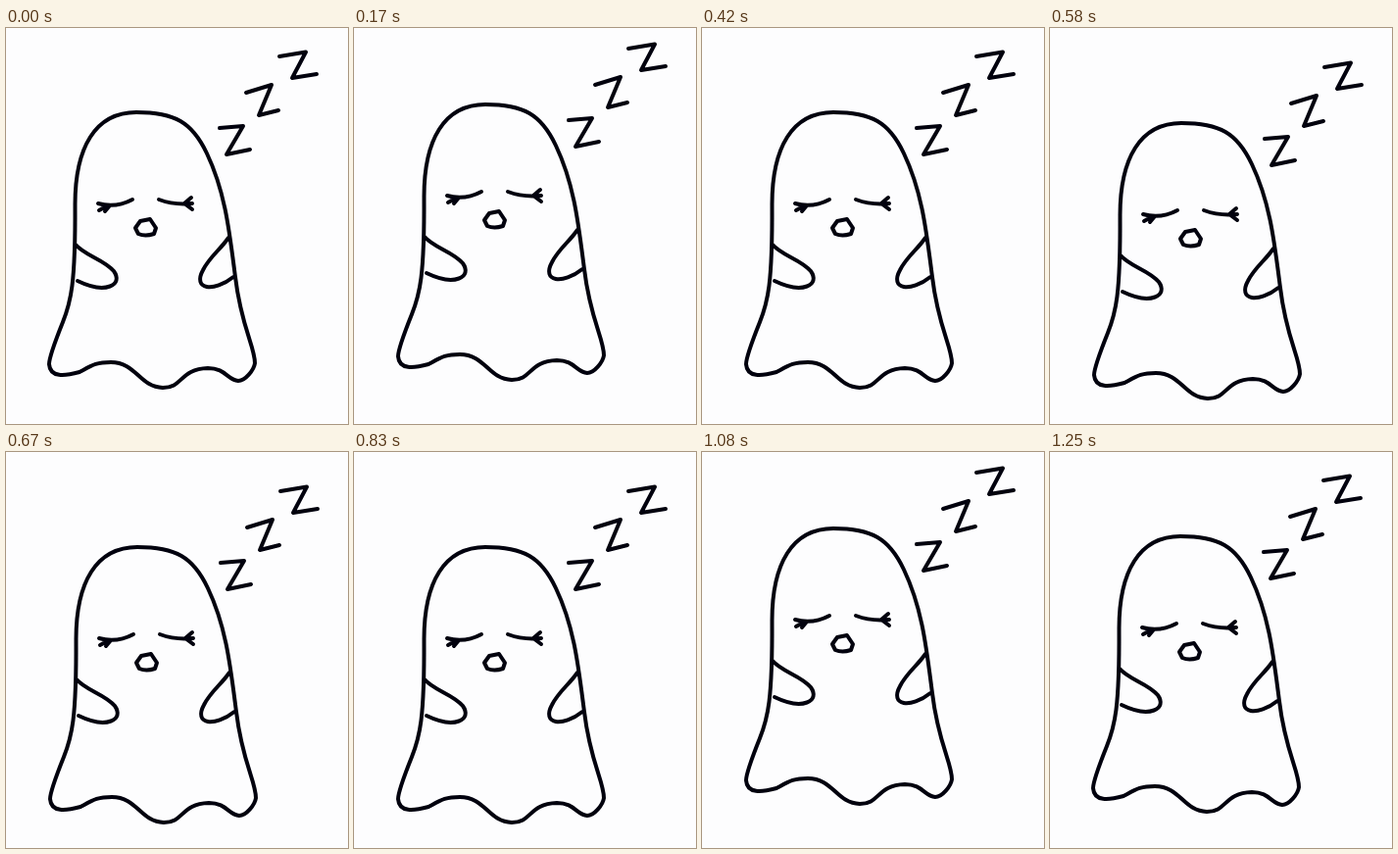
An HTML page with a canvas for the animation above (1330 ms loop, 349 by 404 pixels).

```html
<!DOCTYPE html>
<html lang="en">
<head>
<meta charset="utf-8">
<title>Sleeping ghost</title>
<style>
html, body { margin: 0; width: 100%; height: 100%; overflow: hidden; background: #fdfdfe; }
canvas { display: block; }
</style>
</head>
<body>
<canvas id="stage" width="349" height="404"></canvas>
<script>
const ctx = document.getElementById('stage').getContext('2d');
const LOOP = 1330, STEP = 1000 / 12, STEPS = 16;
const HEIGHTS = [0, -8, 0, 11];

const body = `M133 86C91 86 70.5 122 70.5 180C71 262 66 280 58 300
  C50 320 44 336 44 343C45 357 60 355 75 351C88 344 92 341 107 341
  C133 341 136 366 160 367C181 367 177 348 206 347C224 347 226 359 237 360
  C244 360 253 349 254 342C254 325 240 305 234 254
  C228 208 224 168 205 128C190 96 172 86 133 86Z`;

const arms = `M71 221C80 232 100 236 110 248C120 262 102 272 73 258
  M227 214C218 227 208 233 201 247C190 267 212 270 232 254`;

const eyes = `M129 175Q112 184 94 179M104 181L95 186M106 181L101 187
  M156 175Q172 181 190 179M182 179L189 173M182 179L190 185`;

const mouth = 'M137 197L147 195L153 204L151 210Q142 213 135 210L132 204Z';

const snores = `M218 102L242 100L225 129L249 124
  M245 66L271 58L258 89L278 84M279 29L306 24.5L292 51L317 47`;

const ghost = new Path2D(body + arms + eyes + mouth + snores);

// Held poses, played forwards and then backwards
function pose(ms) {
  const i = Math.floor((ms + 8) / STEP);
  const k = Math.min(i, STEPS - i);
  const p = Math.max(0, Math.min(3, k >> 1));
  return [p ? 1 : 0, HEIGHTS[p]];
}

function draw(ms) {
  ctx.resetTransform();
  ctx.fillStyle = '#fdfdfe';
  ctx.fillRect(0, 0, 349, 404);
  ctx.translate(...pose(ms));
  ctx.strokeStyle = '#02020e';
  ctx.lineWidth = 4;
  ctx.lineCap = ctx.lineJoin = 'round';
  ctx.stroke(ghost);
}

const start = performance.now();
function tick() {
  draw((performance.now() - start) % LOOP);
  requestAnimationFrame(tick);
}
tick();
</script>
</body>
</html>
```
